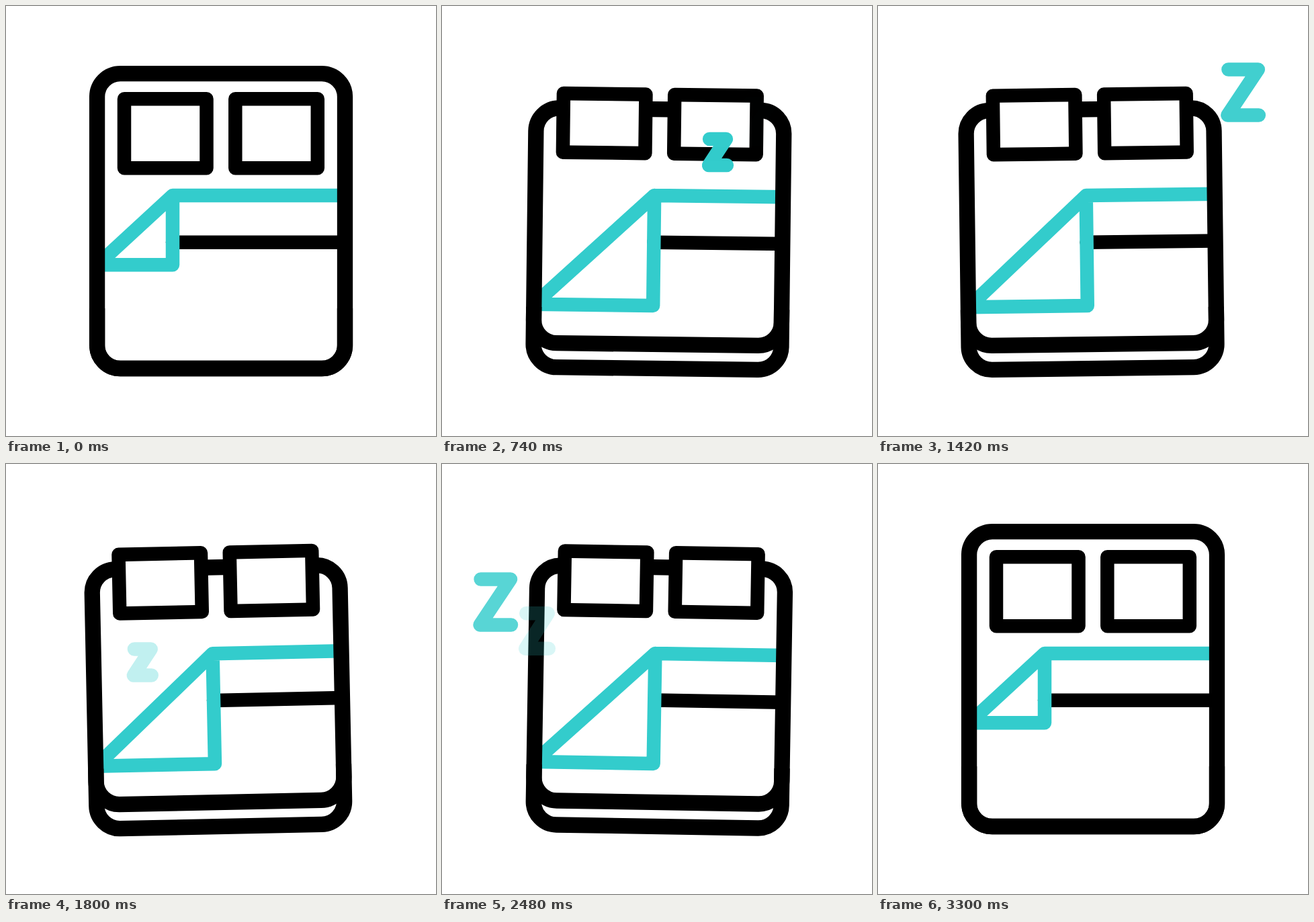
Recreate the animation shown at these times as an HTML page. Size 640 by 640 pixels, loop 3.6 s.

```html
<!DOCTYPE html>
<html lang="en">
<head>
<meta charset="utf-8">
<title>Sleeping bed</title>
<style>
  html, body { margin: 0; width: 100%; height: 100%; overflow: hidden; background: #fff; }
  svg { display: block; width: 100vw; height: 100vh; }
  path, rect { fill: none; stroke: #000; stroke-width: 20.5; stroke-linecap: round; stroke-linejoin: round; }
  .frame { stroke-width: 23.3; stroke-linecap: butt; }
  .pillow { fill: #fff; }
  .teal { stroke: #33cccc; }
</style>
</head>
<body>
<svg viewBox="0 0 640 640">
  <g id="bed">
    <path id="seam"/>
    <path id="cover" class="teal"/>
    <path class="frame" d="M135.6 450V505a34.5 34.5 0 0 0 34.5 34.5H470a34.5 34.5 0 0 0 34.5-34.5V450"/>
    <rect id="mattress" class="frame" x="135.6" width="368.9" rx="34.5"/>
    <rect class="pillow" x="176" width="122.5"/>
    <rect class="pillow" x="341.3" width="122.5"/>
  </g>
  <g id="letters"></g>
</svg>
<script>
const LOOP = 3600;
const $ = id => document.getElementById(id);
const mix = (a, b, p) => a + (b - a) * p;
const smooth = u => u * u * (3 - 2 * u);

// Eased value at time t between keyed times
function track(t, times, values) {
  if (t <= times[0]) return values[0];
  for (let i = 1; i < times.length; i++) {
    if (t < times[i]) {
      const u = (t - times[i - 1]) / (times[i] - times[i - 1]);
      return mix(values[i - 1], values[i], smooth(u));
    }
  }
  return values[values.length - 1];
}

function addLetter(x, y, halfWidth, halfHeight, times) {
  const path = document.createElementNS("http://www.w3.org/2000/svg", "path");
  const left = x - halfWidth, right = x + halfWidth;
  const top = y - halfHeight, bottom = y + halfHeight;
  path.setAttribute("class", "teal");
  path.setAttribute("d", `M${left + 1} ${top}H${right - 1}L${left} ${bottom}H${right}`);
  $("letters").append(path);
  return { path, times };
}

// Each letter fades into the next, larger one
function addSnore(start, places) {
  const sizes = [[13.4, 19.6], [17.3, 26.2], [23.2, 34]];
  const fades = [[0, 170, 170, 490], [170, 490, 510, 830], [510, 830, 830, 1020]];
  return places.map(([x, y], i) =>
    addLetter(x, y, ...sizes[i], fades[i].map(ms => start + ms)));
}

const letters = [
  ...addSnore(560, [[410.5, 217.5], [472.5, 171.5], [543.6, 128.4]]),
  ...addSnore(1739, [[203.3, 295], [141.5, 248.5], [79.8, 205.4]])
];
const pillows = document.querySelectorAll(".pillow");

function setSpan(rect, top, bottom) {
  rect.setAttribute("y", top);
  rect.setAttribute("height", bottom - top);
}

function draw(t) {
  const open = track(t, [0, 605, 2720, 3300], [0, 1, 1, 0]);
  const angle = track(t, [530, 1067, 1636, 2205, 2740], [0, 2, -2, 2, 0]);
  const foldX = mix(248, 313, open);
  const foldY = mix(385.2, 446, open);

  $("bed").setAttribute("transform", `rotate(${angle} 320 545)`);
  $("seam").setAttribute("d", `M${foldX} 351.7H504`);
  $("cover").setAttribute("d", `M504 282H${foldX}V${foldY}H136ZL${foldX} 282L136 ${foldY}`.replace("Z", ""));
  setSpan($("mattress"), mix(100.6, 153.7, open), mix(539.5, 503.5, open));
  for (const pillow of pillows) {
    setSpan(pillow, mix(138.3, 131.8, open), mix(241.3, 219.4, open));
  }
  for (const { path, times } of letters) {
    path.setAttribute("opacity", track(t, times, [0, 1, 1, 0]));
  }
}

const began = performance.now();
function tick() {
  draw((performance.now() - began) % LOOP);
  requestAnimationFrame(tick);
}
draw(0);
requestAnimationFrame(tick);
</script>
</body>
</html>
```
